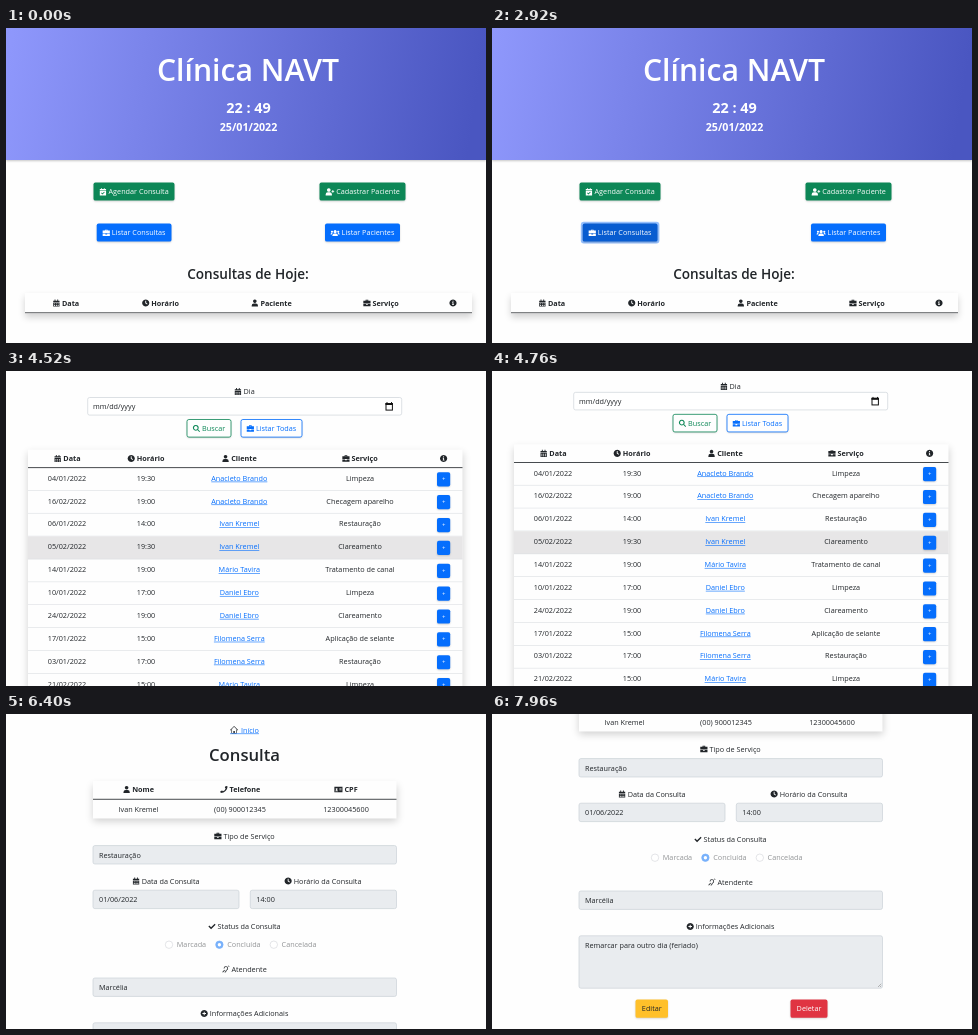
An HTML page with a canvas that plays this animation: 480 by 315 pixels, repeating every 8000 ms.

```html
<!DOCTYPE html>
<html lang="pt-BR">
<head>
<meta charset="utf-8">
<title>Clínica</title>
<style>
html, body { margin: 0; width: 100%; height: 100%; overflow: hidden; background: #fefefe; }
canvas { display: block; width: 480px; height: 315px; }
</style>
</head>
<body>
<canvas id="stage"></canvas>
<script>
const W = 480, H = 315, LOOP = 8000;
const FONT = '"Open Sans", "Noto Sans", sans-serif';
const INK = '#212529', BLUE = '#056efd', GREEN = '#0d8757', PAPER = '#fefefe';
const BODY = 7.25;
const canvas = document.getElementById('stage');
const ctx = canvas.getContext('2d');
const dpr = window.devicePixelRatio || 1;
canvas.width = W * dpr;
canvas.height = H * dpr;

const DISC = 'M8 0a8 8 0 1 0 .01 0z';
const PERSON = 'M8 0a4 4 0 1 0 .01 0zM1 16v-2a5 5 0 0 1 5-5h4a5 5 0 0 1 5 5v2z';
const icon = (d, w = 16) => ({ path: new Path2D(d), w });
const ICONS = {
  calendar: icon('M1 3h3V0h2v3h4V0h2v3h3v3H1zM1 7h14v9H1zM3 9v2h2V9zM7 9v2h2V9zM11 9v2h2V9zM3 12.5v2h2v-2zM7 12.5v2h2v-2zM11 12.5v2h2v-2z'),
  booked: icon('M1 2h3V0h2v2h4V0h2v2h3v3H1zM1 6h14v10H1zM4 11l3 3 5-5-1.3-1.3L7 11.3 5.3 9.7z'),
  clock: icon(DISC + 'M7 3h2v4.5l3 2-1 1.6L7 8.6z'),
  user: icon(PERSON),
  users: icon('M10 2a3.5 3.5 0 1 0 .01 0zM4 15v-2a4 4 0 0 1 4-3.5h4a4 4 0 0 1 4 3.5v2zM3 3.5a2.2 2.2 0 1 0 .01 0zM17 3.5a2.2 2.2 0 1 0 .01 0zM0 12v-1.5a2.5 2.5 0 0 1 2.5-2h2l-2 3.5zM20 12v-1.5a2.5 2.5 0 0 0-2.5-2h-2l2 3.5z', 20),
  userPlus: icon(PERSON + 'M16 4h2v2h2v2h-2v2h-2V8h-2V6h2z', 20),
  briefcase: icon('M5 3V1h6v2h5v6H0V3zM6.5 3h3v-.6h-3zM0 10h6v2h4v-2h6v5H0z'),
  info: icon(DISC + 'M7 3h2v2H7zM6 6.5h3V11h1v1.5H6V11h1V8H6z'),
  plus: icon(DISC + 'M7 4h2v3h3v2H9v3H7V9H4V7h3z'),
  search: icon('M6.5 0a6.5 6.5 0 1 0 .01 0zM6.5 2.5a4 4 0 1 1-.01 0zM10.3 11.7l1.4-1.4 4.3 4.2-1.5 1.5z'),
  house: icon('M8-1l9 9-1 1-8-8-8 8-1-1zM2 8l1.4-1.4v8h3V10h3.2v4.6h3v-8L14 8v8H2z', 18),
  phone: icon('M12 0l4 1c0 8.5-6.5 15-15 15L0 12l4-2 2 2a10 10 0 0 0 6-6l-2-2z'),
  card: icon('M0 2h18v12H0zM5 5a2 2 0 1 0 .01 0zM2 12h6c0-3-6-3-6 0zM11 5v1.5h5V5zM11 8v1.5h5V8z', 18),
  check: icon('M0 9l2-2 4 4 8-8 2 2L6 15z'),
  ear: icon('M3 7a5 5 0 0 1 10 0c0 4-4 3-4 6a2.5 2.5 0 0 1-4 2l1-1.5a1 1 0 0 0 1.3-.5c0-4 4-3 4-6a3.3 3.3 0 0 0-6.6 0zM0 14.5L1.5 16 6 11 4.7 9.8zM13 1.5l1-1.2 2 2-1 1z')
};
const UNIT = 0.45;

const PEOPLE = ['Anacleto Brando', 'Ivan Kremel', 'Mário Tavira', 'Daniel Ebro', 'Filomena Serra', 'Caio Ebro'];
const SERVICES = ['Limpeza', 'Checagem aparelho', 'Restauração', 'Clareamento', 'Tratamento de canal', 'Aplicação de selante'];
const VISITS = [
  ['04/01', '19:30', 0, 0], ['16/02', '19:00', 0, 1], ['06/01', '14:00', 1, 2],
  ['05/02', '19:30', 1, 3], ['14/01', '19:00', 2, 4], ['10/01', '17:00', 3, 0],
  ['24/02', '19:00', 3, 3], ['17/01', '15:00', 4, 5], ['03/01', '17:00', 4, 2],
  ['21/02', '15:00', 2, 0], ['01/02', '14:30', 5, 1], ['18/01', '17:00', 5, 5]
];
const ROW_TOP = 144.3, ROW_H = 22.87;

const clamp = x => Math.max(0, Math.min(1, x));
const ramp = (t, start, dur) => clamp((t - start) / dur);
const smooth = (t, start, dur = 200) => { const u = ramp(t, start, dur); return u * u * (3 - 2 * u); };
const mix = (a, b, u) => `rgb(${a.map((v, i) => Math.round(v + (b[i] - v) * u))})`;
const hoverBlue = u => mix([5, 110, 253], [8, 92, 208], u);

function setFont(size, weight) { ctx.font = `${weight} ${size}px ${FONT}`; }

function text(str, x, y, { size = BODY, weight = 400, color = INK, align = 'center' } = {}) {
  setFont(size, weight);
  ctx.textAlign = align;
  ctx.fillStyle = color;
  ctx.fillText(str, x, y + size * 0.36);
}

function glyph(name, x, y, color = INK) {
  ctx.save();
  ctx.translate(x, y - 8 * UNIT);
  ctx.scale(UNIT, UNIT);
  ctx.fillStyle = color;
  ctx.fill(ICONS[name].path, 'evenodd');
  ctx.restore();
}

// Icon and text, centred together on x.
function label(name, str, x, y, { weight = 400, color = INK } = {}) {
  setFont(BODY, weight);
  const iw = ICONS[name].w * UNIT + 2;
  const left = x - (iw + ctx.measureText(str).width) / 2;
  glyph(name, left, y, color);
  text(str, left + iw, y, { weight, color, align: 'left' });
}

function underline(left, width, y) {
  ctx.fillStyle = BLUE;
  ctx.fillRect(left, y + 3.5, width, 0.6);
}

function link(str, x, y) {
  text(str, x, y, { color: BLUE });
  const w = ctx.measureText(str).width;
  underline(x - w / 2, w, y);
}

function box(x, y, w, h, { r = 1.9, fill, stroke, line = 0.7, shadow } = {}) {
  ctx.beginPath();
  ctx.roundRect(x, y, w, h, r);
  ctx.save();
  if (shadow) {
    const [dy, blur, alpha] = shadow;
    ctx.shadowOffsetY = dy * dpr;
    ctx.shadowBlur = blur * dpr;
    ctx.shadowColor = `rgba(0,0,0,${alpha})`;
  }
  if (fill) { ctx.fillStyle = fill; ctx.fill(); }
  ctx.restore();
  if (stroke) { ctx.strokeStyle = stroke; ctx.lineWidth = line; ctx.stroke(); }
}

function button(x, y, w, h, fill, focus = 0) {
  if (focus) box(x - 1.9 * focus, y - 1.9 * focus, w + 3.8 * focus, h + 3.8 * focus, { r: 3, fill: 'rgba(49,132,253,.5)' });
  box(x, y, w, h, { fill, shadow: [0.8, 2, 0.18] });
}

function iconButton(x, y, w, fill, name, str, focus) {
  button(x, y, w, 18, fill, focus);
  label(name, str, x + w / 2, y + 9.2, { color: '#fff' });
}

function outlineButton(x, y, w, color, name, str) {
  box(x, y, w, 17.6, { fill: PAPER, stroke: color, line: 0.8, shadow: [0.8, 2, 0.2] });
  label(name, str, x + w / 2, y + 9, { color });
}

function card(x, y, w, h) { box(x, y, w, h, { r: 0, fill: PAPER, shadow: [3.8, 7.6, 0.18] }); }

function rule(x, y, w, color, h = 0.7) {
  ctx.fillStyle = color;
  ctx.fillRect(x, y, w, h);
}

function heads(list, y) {
  for (const [name, str, x] of list) label(name, str, x, y, { weight: 700 });
}

function pageTop(title) {
  glyph('house', 224.5, 16);
  text('Início', 235, 16, { color: BLUE, align: 'left' });
  underline(224, 11 + ctx.measureText('Início').width, 16);
  text(title, 238.5, 41, { size: 16.7, weight: 600 });
}

function home(t) {
  const g = ctx.createLinearGradient(0, 0, 470, 75);
  g.addColorStop(0, '#8f98fc');
  g.addColorStop(1, '#4a56c1');
  box(0, 0, W, 132, { r: 0, fill: g, shadow: [1, 2, 0.22] });
  const white = { color: '#fff' };
  text('Clínica NAVT', 242, 42.5, { ...white, size: 30.2, weight: 600 });
  text('22 : 49', 242.5, 79.5, { ...white, size: 14.4, weight: 650 });
  text('25/01/2022', 242.5, 98.8, { ...white, size: 10.7, weight: 650 });

  iconButton(87.5, 154.6, 81, GREEN, 'booked', 'Agendar Consulta');
  iconButton(313.5, 154.6, 86, GREEN, 'userPlus', 'Cadastrar Paciente');
  iconButton(90.7, 195.6, 74.8, hoverBlue(ramp(t, 2620, 150)), 'briefcase', 'Listar Consultas', ramp(t, 2800, 120));
  iconButton(319, 195.6, 75, BLUE, 'users', 'Listar Pacientes');

  text('Consultas de Hoje:', 242, 246, { size: 13.6, weight: 600 });
  card(19, 265, 447, 20.4);
  rule(19, 284.3, 447, '#4a4d50', 0.9);
  heads([['calendar', 'Data', 60], ['clock', 'Horário', 154.5], ['user', 'Paciente', 265.5], ['briefcase', 'Serviço', 375]], 275);
  glyph('info', 443.4, 275);
}

function pointerY(t) {
  return 201 - 25 * smooth(t, 4160, 240) - 70 * smooth(t, 5120, 360);
}

function list(t) {
  const scroll = 47.5 * (smooth(t, 4300) + smooth(t, 4720));
  ctx.translate(0, -scroll);
  pageTop('Consultas');
  label('calendar', 'Dia', 238.5, 68);
  box(81.7, 74, 314, 17.6, { fill: '#fff', stroke: '#ced4da' });
  text('mm/dd/yyyy', 87, 83, { align: 'left' });
  ctx.strokeStyle = '#111';
  ctx.lineWidth = 1;
  ctx.strokeRect(380, 80, 6.4, 6.6);
  rule(379.5, 79.5, 7.4, '#111', 2);
  rule(380.5, 78.6, 1, '#111', 1);
  rule(385, 78.6, 1, '#111', 1);
  outlineButton(181, 96, 44, GREEN, 'search', 'Buscar');
  outlineButton(235, 96, 61, BLUE, 'briefcase', 'Listar Todas');

  card(22, 126, 434.5, 20 + ROW_H * VISITS.length);
  heads([['calendar', 'Data', 61.3], ['clock', 'Horário', 140], ['user', 'Cliente', 233.3], ['briefcase', 'Serviço', 354]], 135);
  glyph('info', 434, 135);
  const hovered = Math.floor((pointerY(t) + scroll - ROW_TOP) / ROW_H);
  VISITS.forEach(([day, hour, who, what], i) => {
    const top = ROW_TOP + i * ROW_H, y = top + 10.3;
    if (i === hovered) rule(22, top, 434.5, '#e7e6e7', ROW_H);
    rule(22, top + ROW_H - 0.6, 434.5, '#dcdfe3', 0.6);
    text(day + '/2022', 61, y);
    text(hour, 140, y);
    link(PEOPLE[who], 233.3, y);
    text(SERVICES[what], 354, y);
    const chosen = i === 2;
    button(431, top + 4.4, 13.2, 14.2, hoverBlue(chosen ? ramp(t, 5440, 150) : 0), chosen ? ramp(t, 5860, 100) : 0);
    text('+', 437.6, top + 11.4, { size: 6, color: '#fff' });
  });
  rule(22, 143.7, 434.5, '#33373b', 0.9);
}

function field(x, y, w, str, h = 18.4) {
  box(x, y, w, h, { fill: '#e9ecef', stroke: '#cbd1d7' });
  text(str, x + 6, y + 9.4, { align: 'left' });
}

function radio(x, str, on) {
  const y = 230.7;
  ctx.beginPath();
  ctx.arc(x, y, 3.7, 0, 7);
  ctx.fillStyle = on ? '#78b1fb' : '#fff';
  ctx.fill();
  ctx.strokeStyle = on ? '#78b1fb' : '#d8dade';
  ctx.lineWidth = 0.7;
  ctx.stroke();
  if (on) {
    ctx.beginPath();
    ctx.arc(x, y, 1.7, 0, 7);
    ctx.fillStyle = '#fff';
    ctx.fill();
  }
  text(str, x + 7.8, y, { align: 'left', color: '#929496' });
}

function details(t) {
  ctx.translate(0, -(47.5 * smooth(t, 7120) + 39.5 * smooth(t, 7400)));
  pageTop('Consulta');
  card(87, 67, 303.5, 37.5);
  heads([['user', 'Nome', 132.5], ['phone', 'Telefone', 234.3], ['card', 'CPF', 340]], 75.5);
  rule(87, 84.8, 303.5, '#33373b', 0.9);
  text(PEOPLE[1], 132.5, 95.2);
  text('(00) 900012345', 234, 95.2);
  text('12300045600', 340, 95.2);

  label('briefcase', 'Tipo de Serviço', 238.5, 122);
  field(87, 131.6, 303.5, 'Restauração');
  label('calendar', 'Data da Consulta', 160, 167);
  field(87, 176.2, 146, '01/06/2022');
  label('clock', 'Horário da Consulta', 317, 167);
  field(244.3, 176.2, 146.2, '14:00');
  label('check', 'Status da Consulta', 238.5, 212);
  radio(163, 'Marcada');
  radio(213.4, 'Concluída', true);
  radio(267.8, 'Cancelada');
  label('ear', 'Atendente', 238.5, 255);
  field(87, 264, 303.5, 'Marcélia');
  label('plus', 'Informações Adicionais', 238.5, 299.5);
  field(87, 308.8, 303.5, 'Remarcar para outro dia (feriado)', 52.4);
  ctx.beginPath();
  ctx.moveTo(386, 360);
  ctx.lineTo(389.3, 356.7);
  ctx.moveTo(388, 360);
  ctx.lineTo(389.3, 358.7);
  ctx.strokeStyle = '#777';
  ctx.lineWidth = 0.5;
  ctx.stroke();

  button(143.5, 372.6, 32.5, 18.2, '#ffc02a');
  text('Editar', 159.8, 381.8);
  button(298.5, 372.6, 37, 18.2, '#e03442');
  text('Deletar', 317, 381.8, { color: '#fff' });
}

// Pages with the times they are up; the gaps are blank loading moments.
const PAGES = [[0, 3520, home], [3680, 6040, list], [6240, LOOP, details]];

function draw(now) {
  const t = now % LOOP;
  ctx.setTransform(dpr, 0, 0, dpr, 0, 0);
  ctx.fillStyle = PAPER;
  ctx.fillRect(0, 0, W, H);
  const page = PAGES.find(([from, to]) => t >= from && t < to);
  if (page) page[2](t);
}

const start = performance.now();
function tick() {
  draw(performance.now() - start);
  requestAnimationFrame(tick);
}
tick();
</script>
</body>
</html>
```
